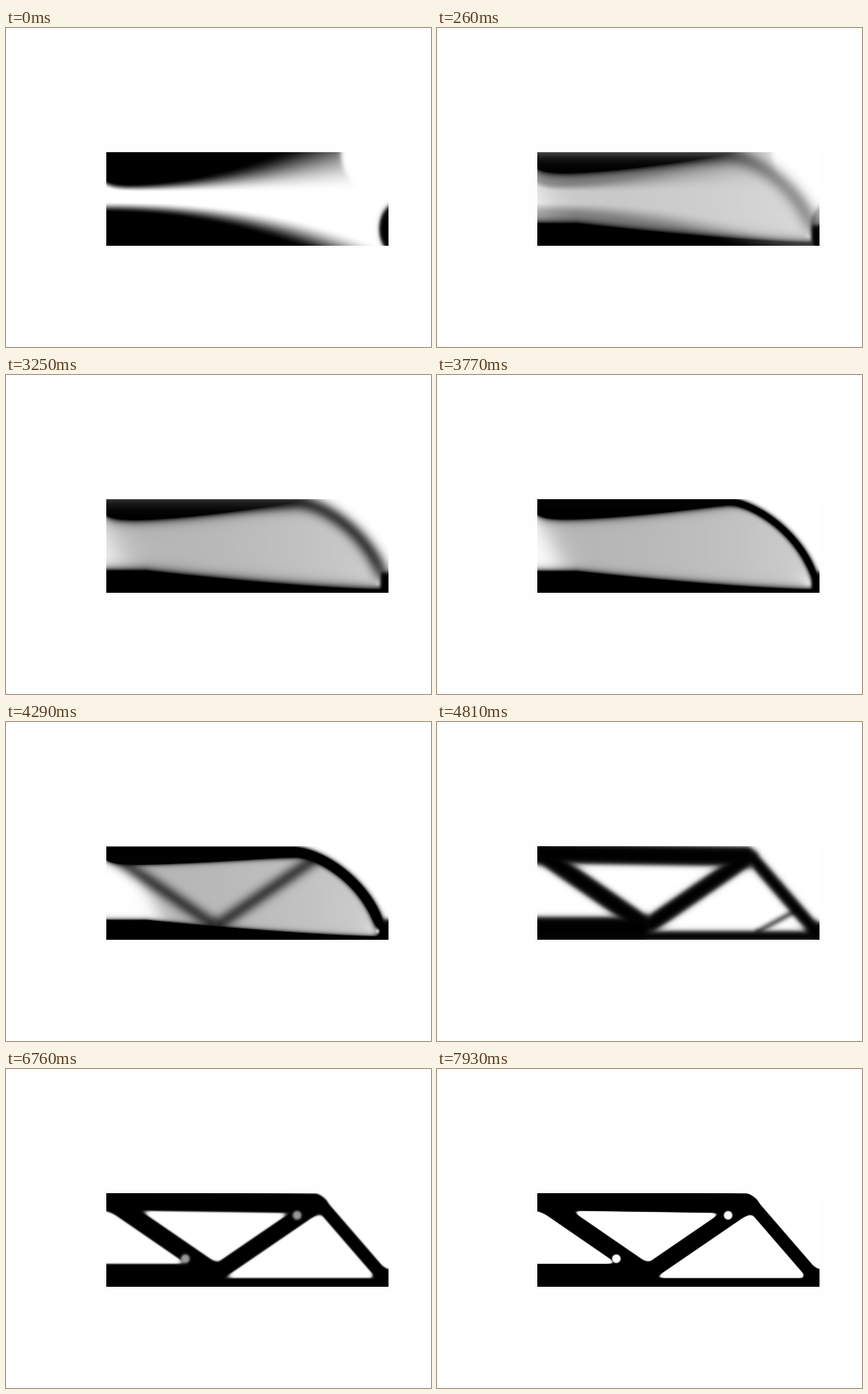
Recreate the animation shown at these times as an HTML page with a canvas. Size 500 px wide and 375 px high, loop 8000 ms.

```html
<!DOCTYPE html>
<html lang="en">
<head>
<meta charset="utf-8">
<title>Beam layout optimisation</title>
<style>
  html, body { margin: 0; width: 100%; height: 100%; overflow: hidden; background: #fefefe; }
  canvas { display: block; }
</style>
</head>
<body>
<canvas id="stage" width="500" height="375"></canvas>
<script>
const LOOP = 8000, TICK = 130;
const LEFT = 118, TOP = 146, WIDTH = 332, HEIGHT = 110;

const { exp, hypot, max, min } = Math;
const clamp = k => max(0, min(1, k));
const lerp = (a, b, k) => a + (b - a) * k;
const smooth = k => clamp(k) ** 2 * (3 - 2 * clamp(k));
const step = k => 1 / (1 + exp(-k));
const over = (a, b) => a + b - a * b;
const edge = d => d < 0 ? 1 : exp(-d);

// Truss members: both ends and the half thickness.
const member = (x1, y1, x2, y2, r) => ({ x1, y1, x2, y2, r });
const DIAGONALS = [member(125, 156.5, 240, 235.5, 10.5), member(252, 237, 358, 164.5, 9.7)];
const MEMBERS = [
  ...DIAGONALS,
  member(90, 154, 363, 158, 11.7),
  member(90, 243, 238, 243, 14),
  member(90, 252, 460, 252, 6.3),
  member(372, 161, 443, 243, 7.5),
  member(445, 246, 460, 246, 10)
];
const WISP = member(378, 246, 420, 223, 0);
const OPENINGS = [[342.5, 172], [211, 223]];

function distance(x, y, m) {
  const dx = m.x2 - m.x1, dy = m.y2 - m.y1;
  const k = clamp(((x - m.x1) * dx + (y - m.y1) * dy) / (dx * dx + dy * dy));
  return hypot(x - m.x1 - k * dx, y - m.y1 - k * dy) - m.r;
}

// Minimum with a fillet where two members meet.
function join(a, b) {
  const fillet = 7, h = max(0, fillet - Math.abs(a - b));
  return min(a, b) - h * h / (4 * fillet);
}

// Each of the three fields below gives the material density from 0 to 1.
function plume(x, y) {
  const u = x - LEFT;
  const blackTop = 184 - 52 * (u / 230) ** 2.2 - 6 * exp(-u / 10);
  const whiteTop = 193 - 5 * exp(-u / 10);
  const whiteEnd = 204 + 43 * (u / 300) ** 2.5;
  const blackEnd = 217 + 43 * (u / 232) ** 2;
  const light = smooth((y - blackTop) / (whiteTop - blackTop)) *
    smooth((blackEnd - y) / (blackEnd - whiteEnd));
  const corner = step((hypot(x - 450, y - 146) - 56) / 1.6);
  const blob = step((1 - hypot((x - 458) / 19, (y - 236) / 29)) / 0.06);
  return over((1 - light) * corner, blob);
}

function body(x, y, s) {
  const u = x - LEFT;
  const roof = s.crown - s.rise * max(0, (x - 150) / 190) ** 1.5 - 6 * exp(-u / 9);
  const floor = lerp(s.floor, 252.5, 1 - (1 - clamp((x - 165) / 275)) ** 1.4);
  const tip = exp(-hypot(x - 437, y - 246) / 8);
  const cleared = step((x - s.clear - 0.5 * (y - 200)) / s.clearSoft);
  const gray = s.gray * (1 - 0.35 * (u / WIDTH) ** 2) * cleared * (1 - tip);

  // The arch is a superellipse; q is 1 on its inner rim.
  const p = 1.62;
  const q = (max(0, (x - 340) / 101) ** p + max(0, (250 - y) / 97) ** p) ** (1 / p);
  const inside = step((s.ring - q) / (s.width * 0.3));
  const arch = min(1, s.arch * (1 - tip) * exp(-(((q - s.ring) / s.width) ** 2)));

  let ink = over(gray, edge((y - roof) / s.soft));
  for (const d of DIAGONALS) {
    ink = over(ink, s.brace * exp(-(((distance(x, y, d) + d.r) / 9) ** 2)));
  }
  ink = over(ink * inside, arch);
  ink = over(ink, edge((floor - y) / s.soft));
  return over(ink, step(x - 441) * step((y - 232) / 1.5));
}

function truss(x, y, s) {
  const d = MEMBERS.map(m => distance(x, y, m)).reduce(join);
  let ink = step(-d / s.blur);
  for (const [hx, hy] of OPENINGS) {
    ink *= 1 - s.opening * step((5 - hypot(x - hx, y - hy)) / (s.blur * 1.6));
  }
  return over(ink, s.wisp * exp(-((distance(x, y, WISP) / 4) ** 2)));
}

function density(x, y, s) {
  if (s.form === 1) return truss(x, y, s);
  const ink = body(x, y, s);
  if (s.form > 0) return lerp(ink, truss(x, y, s), s.form);
  return s.plume > 0 ? lerp(ink, plume(x, y), s.plume ** 2) : ink;
}

// Each stage lists only what changes since the one before.
const STAGES = [
  { at: 0, plume: 1, form: 0,
    crown: 170.5, rise: 22, floor: 230, soft: 4.5, gray: 0.29, clear: 122, clearSoft: 14,
    ring: 1.04, width: 0.12, arch: 0.5, brace: 0, blur: 1.6, opening: 0, wisp: 0.55 },
  { at: 520, plume: 0 },
  { at: 3120 },
  { at: 3770, crown: 169.5, rise: 17, floor: 231, soft: 3.2, clear: 136, clearSoft: 9,
    ring: 1.05, width: 0.05, arch: 1.6 },
  { at: 4290, crown: 167.5, rise: 10, floor: 233, soft: 2, clear: 168, clearSoft: 6,
    ring: 1, width: 0.058, arch: 2.5, brace: 0.65 },
  { at: 4810, form: 1 },
  { at: 5850, blur: 0.7, opening: 0.3, wisp: 0 },
  { at: 7930, blur: 0.2, opening: 1 }
];
STAGES.forEach((s, i) => { STAGES[i] = { ...STAGES[i - 1], ...s }; });

function stateAt(t) {
  const i = max(1, STAGES.findIndex(s => s.at >= t));
  const a = STAGES[i - 1], b = STAGES[i];
  const k = (t - a.at) / (b.at - a.at);
  return Object.fromEntries(Object.keys(a).map(name => [name, lerp(a[name], b[name], k)]));
}

const stage = document.getElementById('stage').getContext('2d');
const image = stage.createImageData(WIDTH, HEIGHT);
let shown = -1;

function paint(t) {
  const s = stateAt(t);
  for (let y = 0, i = 0; y < HEIGHT; y++) {
    for (let x = 0; x < WIDTH; x++, i += 4) {
      const v = 255 * (1 - density(LEFT + x + 0.5, TOP + y + 0.5, s));
      image.data[i] = image.data[i + 1] = image.data[i + 2] = v;
      image.data[i + 3] = 255;
    }
  }
  stage.putImageData(image, LEFT, TOP);
}

function draw() {
  const t = Math.floor(performance.now() % LOOP / TICK) * TICK;
  if (t !== shown) paint(shown = t);
  requestAnimationFrame(draw);
}
draw();
</script>
</body>
</html>
```
